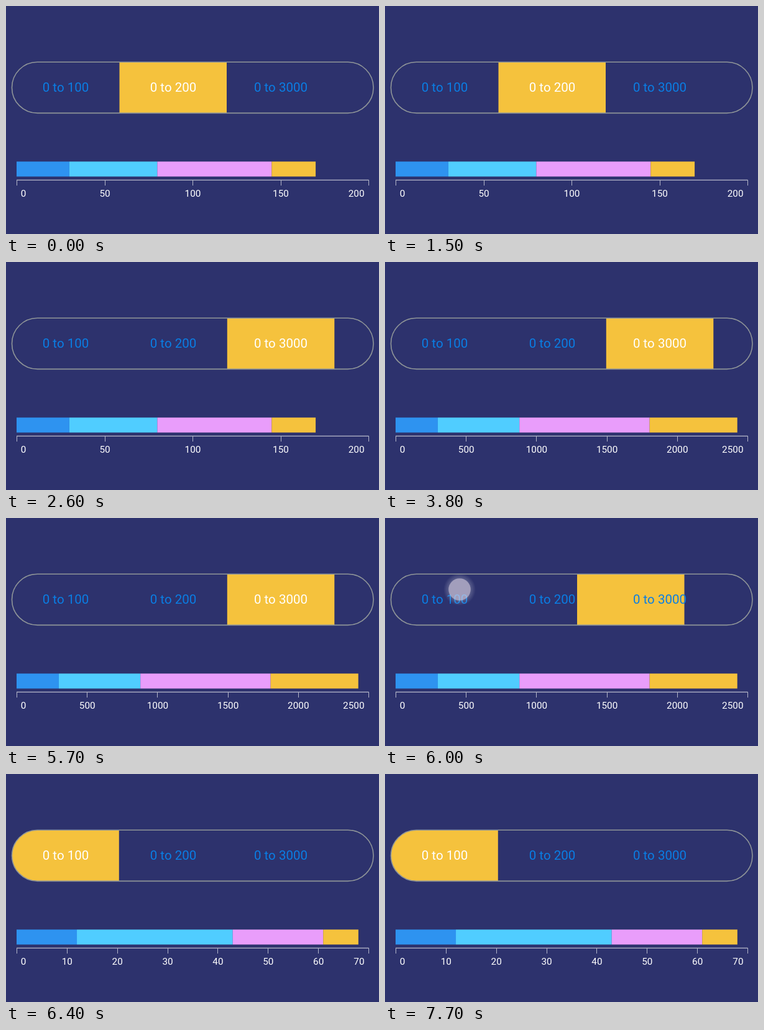
Write an HTML page that moves like this. It is 600 px wide and 367 px high and loops after 8 s.

```html
<!DOCTYPE html>
<html lang="en">
<head>
<meta charset="utf-8">
<title>Range switch</title>
<style>
  html, body { margin: 0; width: 100%; height: 100%; overflow: hidden; background: #2d326d; }
  svg { display: block; width: 600px; height: 367px; font-family: Roboto, Arial, sans-serif; }
  .option { font-size: 20.5px; text-anchor: middle; }
  .label { font-size: 15.3px; fill: #fff; }
</style>
</head>
<body>
<svg viewBox="0 0 600 367">
  <defs>
    <clipPath id="pillClip"><rect x="9.5" y="90.5" width="581" height="81.5" rx="40.75"/></clipPath>
    <radialGradient id="halo">
      <stop offset="0.66" stop-color="#fff" stop-opacity="0.22"/>
      <stop offset="1" stop-color="#fff" stop-opacity="0"/>
    </radialGradient>
  </defs>
  <g clip-path="url(#pillClip)">
    <rect id="thumb" y="90" width="172.5" height="83" fill="#f5c23d"/>
  </g>
  <rect x="9.5" y="90.2" width="581.5" height="82.2" rx="41" fill="none" stroke="#8f9598" stroke-width="1.6"/>
  <g id="options"></g>
  <g id="touch" opacity="0">
    <circle r="26" fill="url(#halo)"/>
    <circle r="17.8" fill="#d9cfe0" fill-opacity="0.56"/>
  </g>
  <g id="chart"></g>
</svg>
<script>
const LOOP = 8000;
const BLUE = '#0a7ee4';
const COLORS = ['#2e93f0', '#50cdff', '#e99dfb', '#f5c23d'];
const AXIS = { left: 17, right: 583, y: 280.2 };

const ranges = [
  { name: '0 to 100', x: 96, thumb: 9.3, max: 70, step: 10, stops: [12, 43, 61, 68] },
  { name: '0 to 200', x: 269, thumb: 182.5, max: 200, step: 50, stops: [30, 80, 145, 170] },
  { name: '0 to 3000', x: 442, thumb: 355.8, max: 2500, step: 500, stops: [300, 880, 1805, 2428] }
];

// Each tap: finger fades in and out, thumb slides, then the chart switches.
const taps = [
  { from: 1, to: 2, x: 472, y: 133, down: 2230, up: 2420, slide: 2370, swap: 2650 },
  { from: 2, to: 0, x: 120, y: 115, down: 5840, up: 6010, slide: 5974, swap: 6250 }
];
const SLIDE = 200, FADE_IN = 100, FADE_OUT = 180;

const $ = id => document.getElementById(id);
const clamp = v => Math.max(0, Math.min(1, v));

function add(parent, tag, attrs, text) {
  const el = document.createElementNS('http://www.w3.org/2000/svg', tag);
  for (const key in attrs) el.setAttribute(key, attrs[key]);
  if (text !== undefined) el.textContent = text;
  parent.appendChild(el);
  return el;
}

function buildChart({ max, step, stops }) {
  const g = add($('chart'), 'g', {});
  const toX = v => AXIS.left + (AXIS.right - AXIS.left) * v / max;
  stops.forEach((stop, i) => {
    const x = toX(i ? stops[i - 1] : 0);
    add(g, 'rect', { x, y: 250.4, width: toX(stop) - x, height: 24.1, fill: COLORS[i] });
  });
  add(g, 'line', { x1: AXIS.left, x2: AXIS.right + 0.5, y1: AXIS.y, y2: AXIS.y, stroke: '#a3a5bd', 'stroke-width': 1.6 });
  for (let v = 0; v <= max; v += step) {
    const x = Math.round(toX(v)) + 0.5;
    add(g, 'line', { x1: x, x2: x, y1: 280, y2: 289, stroke: '#b4b6c9', 'stroke-width': 1 });
    const [tx, anchor] = v === 0 ? [23.7, 'start'] : v === max ? [576.5, 'end'] : [toX(v) + 0.5, 'middle'];
    add(g, 'text', { class: 'label', x: tx, y: 307, 'text-anchor': anchor }, v);
  }
  return g;
}

const options = ranges.map(r => add($('options'), 'text', { class: 'option', x: r.x, y: 138.2 }, r.name));
const charts = ranges.map(buildChart);

function draw(t) {
  let thumb = ranges[1].thumb, selected = 1, shown = 1, alpha = 0, finger = taps[0];
  for (const tap of taps) {
    const p = clamp((t - tap.slide) / SLIDE);
    if (p > 0) {
      const a = ranges[tap.from].thumb, b = ranges[tap.to].thumb;
      thumb = a + (b - a) * p;
      selected = p < 1 ? -1 : tap.to;
    }
    if (t >= tap.swap) shown = tap.to;
    const visible = clamp((t - tap.down) / FADE_IN) * (1 - clamp((t - tap.up) / FADE_OUT));
    if (visible > 0) { alpha = visible; finger = tap; }
  }
  $('thumb').setAttribute('x', thumb);
  options.forEach((el, i) => el.setAttribute('fill', i === selected ? '#fff' : BLUE));
  charts.forEach((el, i) => el.setAttribute('visibility', i === shown ? 'visible' : 'hidden'));
  $('touch').setAttribute('opacity', alpha);
  $('touch').setAttribute('transform', `translate(${finger.x} ${finger.y})`);
}

const start = performance.now();
function tick() {
  draw((performance.now() - start) % LOOP);
  requestAnimationFrame(tick);
}
tick();
</script>
</body>
</html>
```
